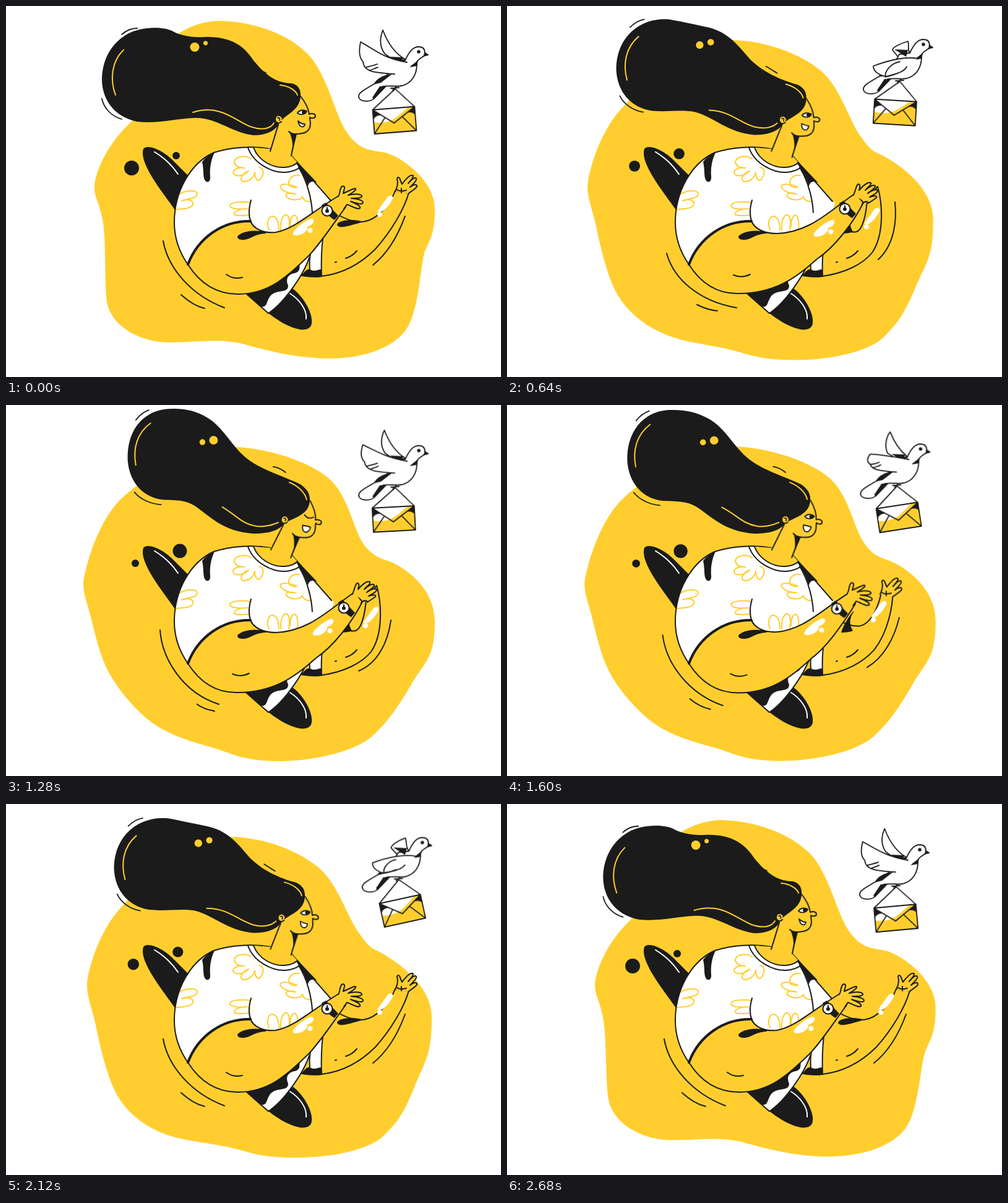
An HTML page without scripts that plays this animation: 800 px wide and 600 px high, repeating every 2720 ms.

```html
<!DOCTYPE html>
<html lang="en">
<head>
<meta charset="utf-8">
<title>Flying post</title>
<style>
  html, body { margin: 0; height: 100%; overflow: hidden; background: #fff; }
  svg { display: block; width: 100vw; height: 100vh; }
  path, circle, ellipse { stroke-linecap: round; stroke-linejoin: round; }
  .ink { fill: #1b1b1b; }
  .sun { fill: #ffce2e; }
  .white { fill: #fff; }
  .line { stroke: #1b1b1b; stroke-width: 2; }
  .thin { stroke: #1b1b1b; stroke-width: 1.8; }
  .glow { stroke: #ffce2e; stroke-width: 2; }
  .shine { stroke: #fff; stroke-width: 2; }
  .open { fill: none; }

  /* Shared motions: every part carries its own end pose */
  .sway { animation: morph 1.36s cubic-bezier(.35, .08, .6, 1) infinite alternate; }
  .clap { animation: morph 2.72s linear(0, 0 15%, 1 21%, 1 56%, 0 62%, 0) infinite; }
  .clap.move, .clap.hand { animation-name: shift; }
  .flap { animation: flap 1.36s linear infinite; }
  .swish { d: var(--a); animation: swish 2.72s linear infinite; }
  .dot { animation: dot 1.36s cubic-bezier(.35, .08, .6, 1) infinite alternate; }
  .head { transform-origin: 432px 240px; animation: nod 1.36s cubic-bezier(.35, .08, .6, 1) infinite alternate; }
  .bird { animation: glide .68s cubic-bezier(.45, 0, .6, 1) infinite alternate; }
  .letter { transform-origin: 629px 134px; animation: swing 1.36s cubic-bezier(.37, 0, .63, 1) -2.04s infinite alternate; }
  .blob { animation: blob 1.36s linear infinite alternate; }
  .apart { animation: apart 2.72s step-end infinite; }
  .joined { animation: joined 2.72s step-end infinite; }
  .awake { animation: awake 2.72s step-end infinite; }
  .blink { animation: blink 2.72s step-end infinite; }

  @keyframes morph { to { d: var(--to); } }
  @keyframes shift { to { transform: var(--to); } }
  @keyframes dot { to { cx: var(--x); cy: var(--y); r: var(--r); } }
  @keyframes nod { to { transform: rotate(10deg); } }
  @keyframes glide { to { transform: translate(6px, -12px); } }
  @keyframes swing { from { transform: rotate(3.5deg); } to { transform: rotate(-12.5deg); } }
  @keyframes flap { 24%, 71% { d: var(--mid); } 42%, 54% { d: var(--to); } }
  @keyframes swish { 0%, 70%, 100% { d: var(--a); } 23.5% { d: var(--b); } 47% { d: var(--c); } }
  @keyframes apart { 0% { opacity: 1; } 20% { opacity: 0; } 57% { opacity: 1; } }
  @keyframes joined { 0% { opacity: 0; } 20% { opacity: 1; } 57% { opacity: 0; } }
  @keyframes awake { 0% { opacity: 1; } 43.5% { opacity: 0; } 51% { opacity: 1; } }
  @keyframes blink { 0% { opacity: 0; } 43.5% { opacity: 1; } 51% { opacity: 0; } }
  @keyframes blob {
    44% {
      d: path("M365,53C420,55 470,75 503,101S550,180 570,208S592,233 603,239S688,285 688,345S679,412 660,458S634,512 612,535S530,572 468,572S395,562 355,554S290,545 260,535S190,500 172,455S148,368 142,345S131,310 131,292S150,200 193,160C220,120 290,55 365,53Z");
      animation-timing-function: cubic-bezier(.2, .5, .4, 1);
    }
    to {
      d: path("M375,68C430,72 490,92 521,118S560,195 575,220S606,248 620,253S693,290 693,350S678,413 655,452S615,515 590,537S500,576 440,576S360,561 330,553S255,532 225,505S170,445 158,415S139,348 133,328S125,300 125,288S145,188 190,148C225,115 310,68 375,68Z");
    }
  }
</style>
</head>
<body>
<svg viewBox="0 0 800 600">
  <path class="blob sun" d="M345,24C400,25 455,45 487,77S530,172 550,203S590,233 612,237S693,280 693,328S682,380 676,400S668,485 650,518S580,570 525,570S425,558 385,547S300,545 260,544S165,520 162,470S162,370 155,340S143,310 143,292S160,225 205,185C215,90 270,26 345,24Z"/>

  <circle class="dot ink" cx="203" cy="262" r="12" style="--x:209px;--y:256px;--r:6px"/>
  <circle class="dot ink" cx="275" cy="242" r="6" style="--x:281px;--y:236px;--r:11.5px"/>

  <!-- Motion lines -->
  <g class="open line">
    <path class="swish" style="--a:path('M254,380C262,425 300,468 353,488');--b:path('M258,400C270,443 312,478 371,488');--c:path('M249,364C252,410 285,465 344,484')"/>
    <path class="swish" style="--a:path('M283,467C294,477 307,486 321,489');--b:path('M307,483C317,488 328,492 340,493');--c:path('M309,484C317,490 326,493 337,495')"/>
    <path class="swish" style="--a:path('M645,340C634,370 617,400 593,419');--b:path('M627,317C630,345 627,385 600,410');--c:path('M622,348C617,385 600,418 570,430')"/>
  </g>

  <!-- Feet and skirt -->
  <path class="ink" d="M222,231C228,223 250,231 268,248L298,278L275,333C255,303 214,255 222,231Z"/>
  <path class="open shine" d="M240,236C255,245 268,257 278,272"/>
  <path class="ink" d="M462,456C482,470 499,502 493,517C484,532 452,519 423,496Z"/>
  <path class="open shine" d="M459,465C472,473 487,490 485,506"/>
  <path class="white" d="M386,463L424,497C450,480 485,430 492,400L440,410Z"/>
  <path class="ink" d="M386,463L412,486C424,490 420,471 432,465C443,459 456,464 456,452C450,438 460,433 467,432C480,428 470,420 479,405L440,410Z"/>
  <path class="open line" d="M388,465L424,497C450,480 485,430 492,400"/>

  <!-- Far sleeve and arm -->
  <path class="white" d="M461,242L530,319L514,370L510,437L490,436L490,400Z"/>
  <path class="ink" d="M461,242L503,286C491,280 486,288 488,302C484,285 478,268 473,261Z"/>
  <path class="open line" d="M461,242L526,316M497,380C490,405 490,415 491,426"/>
  <path class="ink" d="M477,436C481,431 487,424 491,426C500,431 505,425 510,426V438C497,440 485,438 477,436Z"/>
  <path class="clap sun line" d="M510,437C545,433 573,417 597,393C622,365 643,330 651,302L629,299C620,322 600,346 577,349C560,350 545,343 532,335L514,362C510,385 509,410 510,437Z"
    style="--to:path('M510,437C545,432 575,418 590,399C610,370 607,320 599,292L582,312C581,335 575,362 565,365C556,367 548,364 540,360L514,385C510,395 509,410 510,437Z')"/>
  <path class="open line" d="M478,436C490,438 500,438 510,437M532,414.500L534,414M549,408C556,406 562,402 567,396"/>
  <path class="clap ink" d="M574,348C554,343 535,348 535,354C538,361 553,356 574,350Z" style="--to:path('M560,333C552,343 544,355 540,368C548,368 556,367 559,365C553,355 553,345 560,335Z')"/>
  <g class="clap move white" style="--to:translate(-23px,20px)">
    <path d="M600,332L616,310C620,304 627,306 625,312C620,322 612,331 606,333Z"/>
    <circle cx="604" cy="337" r="4"/>
  </g>
  <g class="apart">
    <g class="clap hand" style="--to:translate(-50px,12px)">
      <path class="sun line" d="M629,300C632,294 634,286 632,280C632,276 636,276 637,281L640,288C645,281 652,274 655,274C660,273 658,277 655,281L650,287C656,280 661,276 663,279C665,282 657,289 653,293C659,288 665,288 664,292C661,297 655,299 651,303"/>
      <path class="open line" d="M632,297C637,301 643,299 647,298M639,295L639,302"/>
    </g>
  </g>

  <!-- Shirt -->
  <path class="white" d="M427,231C400,226 365,228 336,237C298,254 272,300 272,350C272,375 280,398 294,418L400,440L480,400L495,335C494,310 488,282 473,261L461,242Z"/>
  <path class="ink" d="M317,252C320,265 318,275 321,281C324,287 331,285 330,276C329,262 331,250 337,237C328,240 322,246 317,252Z"/>
  <path class="open glow" d="M396,247C385,240 369,244 369,253C371,260 378,262 385,262C372,260 364,267 368,272C374,277 385,274 392,267C380,272 377,281 383,284C392,285 401,277 402,269C402,280 408,286 412,279C418,270 416,262 409,261
    M474,274C460,272 455,283 458,290C462,294 466,294 470,293C460,288 445,286 443,292C445,299 458,304 468,304C455,300 450,305 454,309C460,315 476,315 479,308C480,314 487,317 491,316
    M281,304C290,298 307,297 309,303C309,312 295,311 284,315C300,310 306,318 300,324C292,330 280,327 273,330
    M396,318C385,316 362,316 362,323C363,329 380,329 390,328C374,328 366,334 370,338C378,340 386,339 394,338
    M425,362C420,350 425,339 431,340C440,342 441,355 441,362M444,362C443,345 449,336 454,338C460,342 458,355 457,362M459,357C459,342 464,337 468,339C472,344 472,355 471,360"/>
  <path class="open line" d="M427,231C400,226 365,228 336,237C298,254 272,300 272,350C272,375 280,398 294,418M473,261C488,285 494,315 495,334M396,314C390,335 393,350 403,360"/>
  <path class="sun" d="M400,229C408,250 430,262 450,261C460,261 468,256 471,253L461,242L427,231Z"/>
  <path class="open line" d="M391,229C400,255 430,270 452,269C463,268 471,264 475,261M400,229C408,250 430,262 450,261C460,261 468,256 471,253"/>

  <!-- Near arm -->
  <path class="clap sun line" d="M294,418C310,375 350,347 395,348C400,360 415,368 436,366C468,360 492,334 541,305L549,325C525,358 500,395 486,407C455,437 425,466 375,466C340,466 313,448 294,418Z"
    style="--to:path('M294,418C310,375 350,347 395,348C400,360 415,368 436,368C490,366 520,332 563,303L576,318C560,350 530,390 500,410C465,442 430,465 375,465C340,466 313,448 294,418Z')"/>
  <path class="open line" style="stroke-width:4" d="M294,418C310,375 350,347 395,348"/>
  <path class="ink" d="M420,366C400,360 378,366 374,373C374,380 388,379 395,375C405,370 412,368 420,368Z"/>
  <path class="clap open line" d="M356,434C364,440 374,441 382,439" style="--to:path('M366,435C375,439 385,438 393,434')"/>
  <g class="clap move white" style="--to:translate(32px,2px)">
    <path d="M464,367C466,360 484,346 494,344C500,345 498,354 487,357C488,364 478,371 469,371C465,371 463,369 464,367Z"/>
    <circle cx="491.500" cy="363" r="4"/>
  </g>
  <g class="clap move" style="--to:translate(27px,-3px)">
    <path class="ink" d="M510,322L517,318L537,339L531,346C523,342 514,332 510,322Z"/>
    <circle class="white line" cx="519" cy="331" r="8.500"/>
    <circle class="ink" cx="519" cy="331.500" r="3"/>
    <path class="open line" d="M519,331V326"/>
  </g>
  <g class="apart">
    <path class="clap hand sun line" style="--to:translate(25px,-7px)" d="M537,308C540,304 539,299 541,295C543,289 548,291 547,295L545,303C552,300 560,296 564,295C568,296 562,301 553,306C562,303 573,304 575,307C576,311 568,311 558,311C568,312 577,314 577,318C577,322 565,319 557,316C564,319 574,323 572,327C568,330 558,323 551,321L546,328"/>
  </g>
  <path class="joined sun line" d="M560,306C564,296 565,288 568,288C572,289 570,294 569,298C576,290 584,284 588,286C590,289 583,293 579,298C586,292 593,288 595,291C596,295 588,298 583,303C590,298 598,295 599,299C598,304 590,306 586,309C592,307 599,306 597,310C592,314 588,316 584,319M584,318C581,315 578,316 574,320"/>

  <!-- Head -->
  <g class="head">
    <path class="sun" d="M440,190L427,235L461,243L468,207C483,207 492,203 492,190L491,180C494,182 500,182 500,178C500,174 494,173 490,175C489,166 484,156 476,146L440,150Z"/>
    <path class="ink" d="M457,202C461,206 465,207 470,207L463,236C464,222 462,212 457,202Z"/>
    <path class="open line" d="M440,192L427,235M461,242L468,207C483,207 492,203 492,190L491,180C494,182 500,182 500,178C500,174 494,173 490,175C489,166 484,156 476,146M457,203C460,206 464,207 468,207"/>
    <path class="sway white thin" d="M472,186C475,189 479,191 483,191C482,198 474,197 472,186Z" style="--to:path('M471,187C475,187 480,187 484,188C483,200 471,201 471,187Z')"/>
    <g class="awake">
      <path class="white thin" d="M471,173C474,168 481,167 486,170C484,176 475,177 471,173Z"/>
      <ellipse class="ink" cx="481.500" cy="171.500" rx="3.500" ry="3"/>
    </g>
    <path class="blink open thin" d="M471,170Q478,177 486,171"/>
  </g>

  <!-- Hair -->
  <path class="sway ink" d="M476,146C477,133 470,126 460,125C435,124 418,110 400,88C385,65 365,50 325,50C300,52 280,47 268,40C250,32 215,34 195,46C168,62 155,90 155,120C156,155 178,180 212,187C245,191 275,182 305,181C340,180 365,205 400,209C420,209 432,203 440,193C446,176 475,172 476,146Z"
    style="--to:path('M491,155C492,143 486,136 477,129C450,115 410,105 385,83C362,62 350,35 325,20C305,8 285,5 266,6C245,6 225,15 211,34C200,50 196,70 197,90C200,125 222,150 255,153C275,154 290,153 305,163C330,180 350,205 400,208C425,208 440,203 449,193C456,184 490,181 491,155Z')"/>
  <g class="open glow">
    <path class="sway" d="M190,71C170,90 168,120 177,144" style="--to:path('M234,29C212,45 205,70 210,97')"/>
    <path class="sway" d="M302,172C345,158 370,185 395,195C415,202 428,198 433,189" style="--to:path('M350,165C375,180 380,192 405,196C420,198 432,193 440,190')"/>
    <path class="sway" d="M443,128C455,129 468,135 471,144" style="--to:path('M458,125C470,130 483,140 486,153')"/>
  </g>
  <g class="open thin">
    <path class="sway" d="M187,46C195,39 203,36 212,36" style="--to:path('M210,24C217,15 223,11 231,8')"/>
    <path class="sway" d="M155,150C158,165 170,178 187,183" style="--to:path('M208,141C218,153 235,160 251,161')"/>
    <path class="sway" d="M404,95C407,100 413,106 420,108" style="--to:path('M432,100C440,101 446,104 452,109')"/>
  </g>
  <circle class="dot sun" cx="305" cy="66.500" r="7.500" style="--x:317.500px;--y:60px;--r:4.700px"/>
  <circle class="dot sun" cx="322.500" cy="60" r="3.500" style="--x:335.500px;--y:57px;--r:7px"/>
  <g class="head">
    <path class="sun line" d="M446,180C443,175 435,176 435,183C435,189 441,191 445,187"/>
    <path class="open thin" d="M439,181C442,180 443,182 442,185"/>
  </g>

  <!-- Bird with its letter -->
  <g class="bird">
    <g class="letter">
      <path class="white" d="M590,165H658V204H590Z"/>
      <path class="sun" d="M590,185C605,189 620,186 630,178C640,172 645,165 651,165H658V204H590Z"/>
      <path class="ink" d="M590,165L604,175C596,174 592,177 590,182ZM658,165L645,174C652,173 656,175 658,179Z"/>
      <path class="open thin" d="M590,165H658V204H590ZM590,165L623,189L658,165M590,204L609,179M658,204L637,180M590,165L629,134L658,165"/>
    </g>
    <path class="open thin" d="M622,133L635,132M625,136L631,130"/>
    <path class="flap white thin" d="M609,39C604,52 603,65 612,77L632,92L645,86C625,75 615,55 609,39Z"
      style="--mid:path('M621,49C613,56 611,72 614,82L632,92L645,86C633,74 626,62 621,49Z');--to:path('M642,69C632,72 617,78 617,83L626,94L645,88C640,80 645,78 642,69Z')"/>
    <path class="white thin" d="M645,88C652,73 658,66 667,66C674,66 677,70 677,76L682,79L676,80C671,85 664,86 664,94C664,112 655,125 640,129C630,131 620,128 609,130L595,149C590,156 570,156 570,146C570,140 580,135 590,129C602,122 612,116 617,110L628,90Z"/>
    <path class="ink" d="M676,74L683,79L675,82ZM666,87L664,97L653,99C654,96 662,92 666,87ZM594,127C599,117 610,111 624,110L606,124ZM604,130L615,130L595,151L592,148ZM620,82L642,83L639,94Z"/>
    <circle class="ink" cx="667" cy="74" r="2.800"/>
    <path class="flap white thin" d="M648,91C610,85 595,70 573,58C570,72 571,84 577,90C578,108 600,108 628,110"
      style="--mid:path('M648,91C628,87 598,86 590,91C584,94 583,99 588,101C593,111 613,110 628,112');--to:path('M658,97C640,93 612,99 586,109C586,120 600,125 606,126C620,122 635,120 640,110')"/>
    <path class="flap open thin" d="M582,99C590,97 595,96 600,94M588,104C593,102 597,101 601,99"
      style="--mid:path('M587,99C592,99 596,98 600,96M592,104C597,103 600,102 603,100');--to:path('M629,102C615,104 603,118 606,127M606,126C612,126 620,123 627,120')"/>
  </g>
</svg>
</body>
</html>
```
